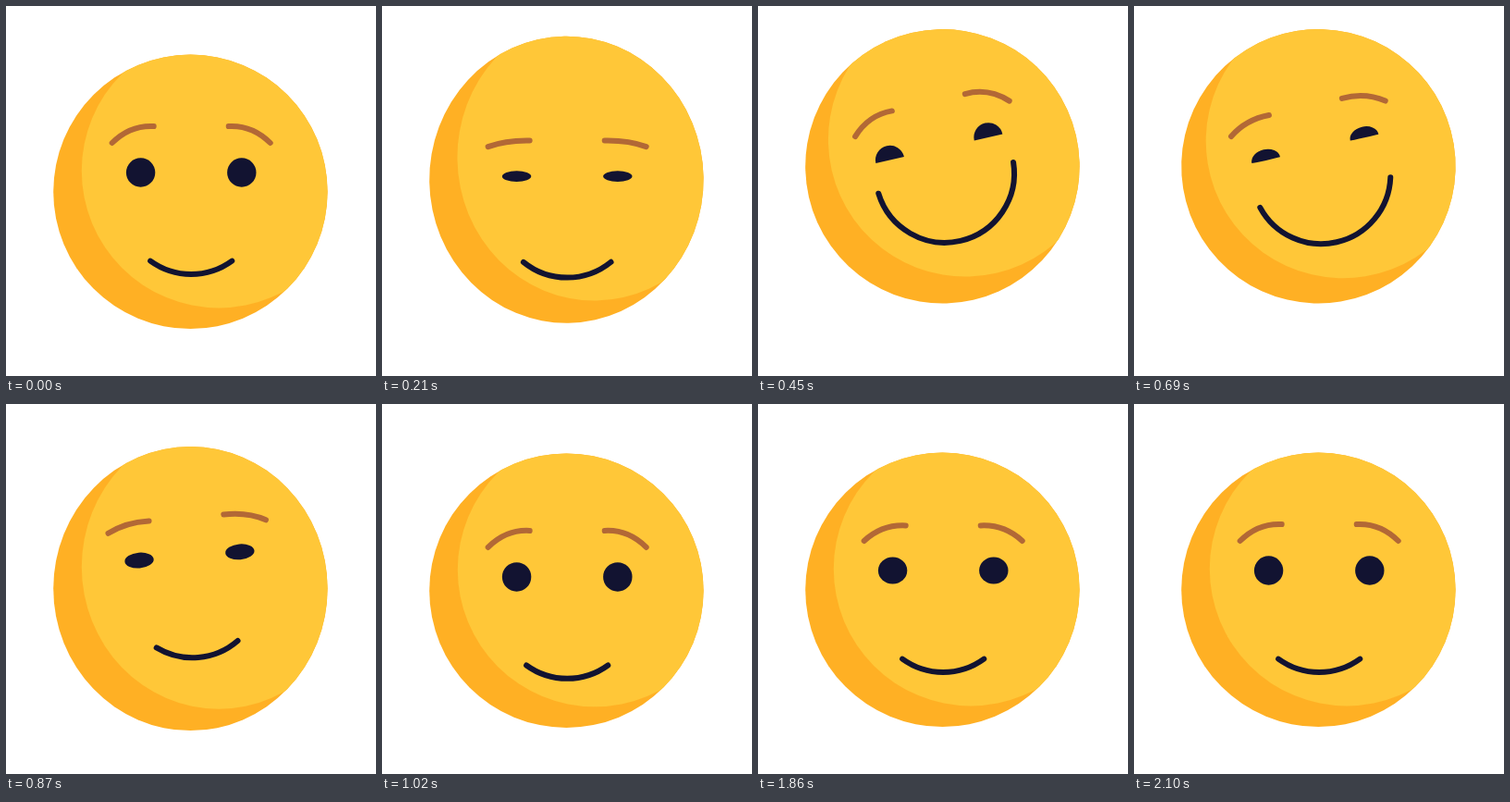
An HTML page that plays this animation: 400x400 px, repeating every 5.15 s.

```html
<!DOCTYPE html>
<html lang="en">
<head>
<meta charset="utf-8">
<title>Smiling face</title>
<style>
html, body { margin: 0; width: 100%; height: 100%; overflow: hidden; background: #fff; }
svg { display: block; width: 100%; height: 100%; }
</style>
</head>
<body>
<svg viewBox="0 0 400 400">
  <defs>
    <clipPath id="disc"><circle r="148.2"/></clipPath>
  </defs>
  <g id="body">
    <circle r="148.2" fill="#ffb024"/>
    <g clip-path="url(#disc)"><circle cx="30.6" cy="-22.6" r="148.2" fill="#ffc738"/></g>
  </g>
  <g id="features" fill="none" stroke-width="6" stroke-linecap="round">
    <path id="browL" stroke="#b26836"/>
    <path id="browR" stroke="#b26836"/>
    <path id="eyeL" fill="#121331"/>
    <path id="eyeR" fill="#121331"/>
    <path id="mouth" stroke="#121331"/>
  </g>
</svg>
<script>
const LOOP = 5150, REST = 1230, EYE = 15.7, SMILE = 75;
const set = (id, name, value) => document.getElementById(id).setAttribute(name, value);

// Smooth 0 to 1 between two times
function ease(t, from, to) {
  const p = Math.min(1, Math.max(0, (t - from) / (to - from)));
  return p * p * (3 - 2 * p);
}

// Rises from a to b, falls from c to d
const pulse = (t, a, b, c, d) => ease(t, a, b) - ease(t, c, d);
const peak = (t, a, b, c) => pulse(t, a, b, b, c);

// Crouch, jump from a to b, drop from c to d, small rebound
function hop(t, a, b, c, d) {
  const rebound = (d + REST) / 2;
  return 7 * ease(t, 0, a) - 34.5 * pulse(t, a, b, c, d)
    - 10 * ease(t, d, rebound) + 3 * ease(t, rebound, REST);
}

function brow(side, open) {
  const at = (x, y) => `${side * x} ${-52.5 + y * open}`;
  return `M${at(85.5, 0)}C${at(73.5, -12)} ${at(58.5, -19)} ${at(40.5, -18)}`;
}

function eye(x, y, top, bottom) {
  return `M${x - EYE} ${y}A${EYE} ${top} 0 0 1 ${x + EYE} ${y}` +
         `A${EYE} ${bottom} 0 0 1 ${x - EYE} ${y}Z`;
}

function mouth(amount) {
  const half = (36 + 50 * amount) * Math.PI / 180;
  const cy = 14.4 - 6.4 * amount;
  const x = SMILE * Math.sin(half), y = cy + SMILE * Math.cos(half);
  return `M${-x} ${y}A${SMILE} ${SMILE} 0 0 0 ${x} ${y}`;
}

function draw(t) {
  const bodyY = 200.8 + hop(t, 100, 300, 730, 937);
  const stretch = 1 + .047 * (peak(t, 100, 200, 310) + peak(t, 735, 840, 940));
  const bodyTilt = -13 * pulse(t, 165, 450, 600, 860);
  set('body', 'transform', `translate(199.4 ${bodyY}) scale(1 ${stretch}) rotate(${bodyTilt})`);

  // The features trail the body
  const faceY = 200.5 + hop(t, 170, 400, 770, 1026);
  const faceTilt = -13 * pulse(t, 205, 450, 700, 993);
  set('features', 'transform', `translate(200.2 ${faceY}) rotate(${faceTilt})`);

  const shut = peak(t, 90, 280, 430) + peak(t, 630, 800, 945) + peak(t, 1838, 1965, 2100);
  const open = 1 - .9 * shut;
  const domed = t > 280 && t < 800;
  const bottom = EYE * (domed ? .1 * shut : open);
  const eyeY = domed ? -19.3 : -20.5;
  for (const [name, side] of [['L', -1], ['R', 1]]) {
    set('brow' + name, 'd', brow(side, open));
    set('eye' + name, 'd', eye(side * 54.6, eyeY, EYE * open, bottom));
  }
  set('mouth', 'd', mouth(pulse(t, 170, 440, 620, 850)));
}

const start = performance.now();
function tick() {
  draw((performance.now() - start) % LOOP);
  requestAnimationFrame(tick);
}
tick();
</script>
</body>
</html>
```
